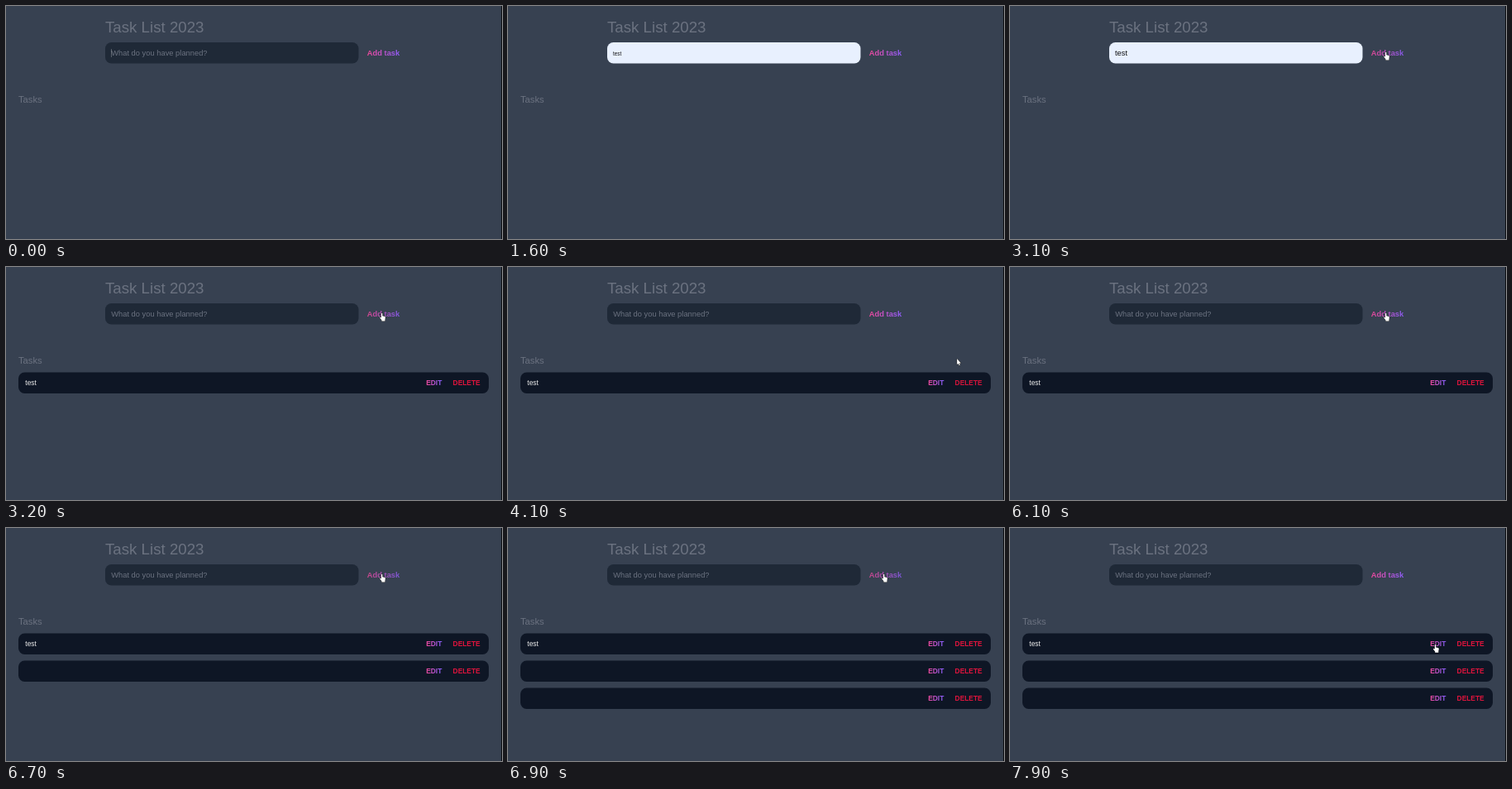
These frames come from a looping animation (600x282 px, 8 s). An HTML page with a canvas:

```html
<!DOCTYPE html>
<html lang="en">
<head>
<meta charset="utf-8">
<title>Task List</title>
<style>
  html, body { margin: 0; width: 100%; height: 100%; overflow: hidden; background: #374151; }
  canvas { display: block; width: 600px; height: 282px; }
</style>
</head>
<body>
<canvas id="stage"></canvas>
<script>
const W = 600, H = 282, LOOP = 8000, TICK = 100;
const DARK = '#374151', DARKER = '#1f2937', DARKEST = '#0e1625', GREY = '#6b7280';
const PINK = '#ec4899', PURPLE = '#8b5cf6', RED = '#dc143c', LIGHT = '#eeeeee';
const FILLED = '#e8f0fe', INK = '#111111';
const BASE = 9.35, SMALL = 8.4;
const FIELD = { x: 120, y: 44, w: 306.5, h: 25.5 };

const AUTOFILL = 1600, ACCEPT = 2000, SUBMIT = 3200;
const ROW_STARTS = [SUBMIT, 6200, 6900];

const point = (x, y) => ({ x, y });
const TYPED = point(300, 58), EXIT = point(317, 46), ADD = point(454.7, 55.7);
const DELETE = point(552, 134), LAST_ROW = point(552, 200), EDIT = point(514.5, 141);

// Each sweep is a quadratic curve; the pointer rests between sweeps
const SWEEPS = [
  { t0: 2300, t1: 3100, from: TYPED, bend: point(400, 44), to: ADD },
  { t0: 3500, t1: 3900, from: ADD, bend: point(500, 95), to: DELETE },
  { t0: 3900, t1: 4800, from: DELETE, bend: point(560, 80), to: EXIT },
  { t0: 5200, t1: 5700, from: EXIT, bend: point(520, 40), to: DELETE },
  { t0: 5700, t1: 6100, from: DELETE, bend: point(515, 90), to: ADD },
  { t0: 7100, t1: 7500, from: ADD, bend: point(510, 120), to: LAST_ROW },
  { t0: 7500, t1: 7900, from: LAST_ROW, bend: point(540, 165), to: EDIT }
];

const canvas = document.getElementById('stage');
const ctx = canvas.getContext('2d');
const dpr = window.devicePixelRatio || 1;
canvas.width = W * dpr;
canvas.height = H * dpr;

const rowY = i => 127.5 + 33 * i;
const rowCount = t => ROW_STARTS.filter(s => t >= s).length;
const inside = (p, r) => p && p.x >= r.x && p.x <= r.x + r.w && p.y >= r.y && p.y <= r.y + r.h;

function pointerAt(t) {
  const s = SWEEPS.filter(s => t >= s.t0).pop();
  if (!s) return null;
  const k = Math.min(1, (t - s.t0) / (s.t1 - s.t0));
  const mix = axis => (1 - k) ** 2 * s.from[axis] + 2 * k * (1 - k) * s.bend[axis] + k * k * s.to[axis];
  return point(mix('x'), mix('y'));
}

function buttonsAt(t) {
  const list = [{ label: 'Add task', tx: 436.8, ty: 60, size: BASE, x: 432, y: 46, w: 49, h: 22 }];
  for (let i = 0; i < rowCount(t); i++) {
    const y = rowY(i), ty = y + 15.6;
    list.push({ label: 'EDIT', tx: 508.2, ty, size: SMALL, x: 505, y: y + 6, w: 26, h: 14 });
    list.push({ label: 'DELETE', tx: 540.6, ty, size: SMALL, x: 537, y: y + 6, w: 40, h: 14, color: RED });
  }
  return list;
}

// Hovering fades a button to 80% over four ticks
function buttonAlpha(b, t) {
  let n = 0;
  for (let i = 0; i < 4; i++) if (inside(pointerAt(t - i * TICK), b)) n++;
  return 1 - 0.05 * n;
}

function text(s, x, y, size, color, weight = 'normal') {
  ctx.font = `${weight} ${size}px "Liberation Sans", Arial, sans-serif`;
  ctx.fillStyle = color;
  ctx.fillText(s, x, y);
}

function panel(r, color) {
  ctx.fillStyle = color;
  ctx.beginPath();
  ctx.roundRect(r.x, r.y, r.w, r.h, 7.5);
  ctx.fill();
}

function gradient(x, width) {
  const g = ctx.createLinearGradient(x, 0, x + width, 0);
  g.addColorStop(0, PINK);
  g.addColorStop(1, PURPLE);
  return g;
}

function drawButton(b, t) {
  const color = b.color || gradient(b.tx, b.label.length * b.size * 0.53);
  ctx.globalAlpha = buttonAlpha(b, t);
  text(b.label, b.tx, b.ty, b.size, color, 'bold');
  ctx.globalAlpha = 1;
}

function caret(x, color) {
  ctx.fillStyle = color;
  ctx.fillRect(x, 52, 0.8, 10);
}

function drawField(t) {
  const filled = t >= AUTOFILL && t < SUBMIT;
  panel(FIELD, filled ? FILLED : DARKER);
  if (filled) text('test', 127, 60, t < ACCEPT ? 6.3 : BASE, INK);
  else text('What do you have planned?', 127.2, 60, BASE, GREY);

  if (t < 200 || (t >= 800 && t < 1300)) caret(127.1, 'rgba(238,238,238,0.35)');
  if (t >= 2100 && t < 2300) caret(142.4, 'rgba(0,0,0,0.55)');
}

function shape(p, path) {
  ctx.save();
  ctx.translate(p.x, p.y);
  ctx.lineJoin = 'round';
  ctx.lineWidth = 0.9;
  ctx.strokeStyle = INK;
  ctx.fillStyle = '#ffffff';
  const outline = new Path2D(path);
  ctx.stroke(outline);
  ctx.fill(outline);
  ctx.restore();
}

function drawBeam(p) {
  ctx.fillStyle = 'rgba(0,0,0,0.7)';
  ctx.fillRect(p.x - 0.4, p.y - 4, 0.8, 8);
  for (const dy of [-4.3, 3.7]) ctx.fillRect(p.x - 1.5, p.y + dy, 3, 0.6);
}

function drawPointer(t, buttons) {
  const p = pointerAt(t);
  if (!p) return;
  if (inside(p, FIELD)) {
    // The dark text beam only shows on the filled field
    if (t < SUBMIT) drawBeam(p);
  } else if (buttons.some(b => inside(p, b))) {
    shape(p, 'M-.7 .5Q0-.4 .7 .5V3.5L3.2 4Q4.4 4.3 4.3 5.4L3.8 8V9.7H-.3V8.5L-2.5 5.7Q-2.6 4.6-1.5 5L-.7 5.8Z');
  } else {
    shape(p, 'M0 0V7.2L1.6 5.8L2.6 8.2L3.7 7.7L2.7 5.4H4.9Z');
  }
}

function draw(t) {
  ctx.setTransform(dpr, 0, 0, dpr, 0, 0);
  ctx.fillStyle = DARK;
  ctx.fillRect(0, 0, W, H);

  text('Task List 2023', 120, 32, 18.7, GREY);
  text('Tasks', 15, 117, 11.2, GREY);
  drawField(t);

  for (let i = 0; i < rowCount(t); i++) {
    panel({ x: 15, y: rowY(i), w: 569, h: 25.5 }, DARKEST);
    if (i === 0) text('test', 23.3, rowY(i) + 15.6, SMALL, LIGHT);
  }
  const buttons = buttonsAt(t);
  buttons.forEach(b => drawButton(b, t));

  ctx.fillStyle = '#0b0d11';
  ctx.fillRect(599, 0, 1, H);
  drawPointer(t, buttons);
}

const start = performance.now();
function loop() {
  const t = (performance.now() - start) % LOOP;
  draw(Math.floor(t / TICK) * TICK);
  requestAnimationFrame(loop);
}
loop();
</script>
</body>
</html>
```
